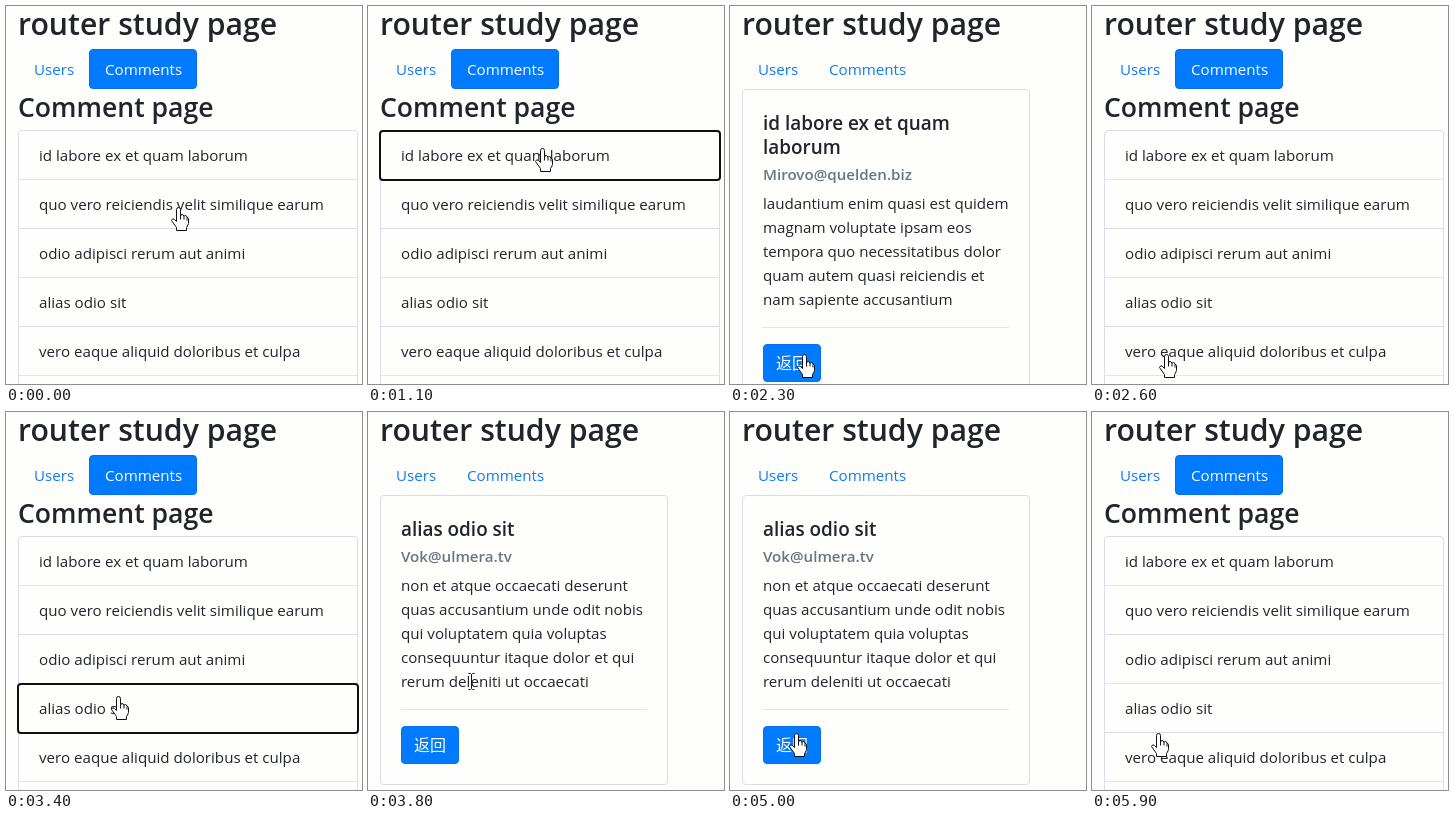
Animation of 356x378 px, one loop 6 s. Source, as an HTML page:

```html
<!DOCTYPE html>
<html lang="en">
<head>
<meta charset="utf-8">
<title>router study page</title>
<style>
  html, body { margin: 0; height: 100%; overflow: hidden; background: #fefefc; }
  svg { display: block; }
  text { font: 15.13px "Open Sans", "Noto Sans", "Noto Sans CJK SC", sans-serif; fill: #212529; }
  .h1 { font-size: 30.2px; font-weight: 600; }
  .h2 { font-size: 26.6px; font-weight: 600; }
  .h5 { font-size: 18.9px; font-weight: 600; }
  .h6 { font-weight: 600; fill: #6c757d; }
  .link { fill: #0f7bee; }
  .on { fill: #fff; }
  .back { font: 16px "Noto Sans CJK SC", "Noto Sans CJK", sans-serif; text-anchor: middle; }
  .button { fill: #007bff; stroke: #0072ee; }
  .box, .rule { fill: none; stroke: #dcdce6; }
  .soft { stroke: #e4e4ea; }
  #focus { fill: none; stroke: #101010; stroke-width: 2; }
  #cursor { fill: #fff; stroke: #111; stroke-linejoin: round; }
</style>
</head>
<body>
<svg width="356" height="378" viewBox="0 0 356 378">
  <text class="h1" x="12" y="29">router study page</text>
  <text class="link" x="28" y="69">Users</text>
  <g id="list"></g>
  <g id="card0"></g>
  <g id="card1"></g>
  <rect id="focus" x="12" width="340" height="49" rx="3"/>
  <path id="cursor"/>
</svg>
<script>
const $ = id => document.getElementById(id);
const text = (x, y, str, cls = '') => `<text class="${cls}" x="${x}" y="${y}">${str}</text>`;
const rect = (x, y, w, h, cls) =>
  `<rect class="${cls}" x="${x + .5}" y="${y + .5}" width="${w - 1}" height="${h - 1}" rx="3.5"/>`;
const rule = (x1, x2, y, cls = '') => `<path class="rule ${cls}" d="M${x1} ${y + .5}H${x2}"/>`;

const rows = [
  'id labore ex et quam laborum',
  'quo vero reiciendis velit similique earum',
  'odio adipisci rerum aut animi',
  'alias odio sit',
  'vero eaque aliquid doloribus et culpa'
];
const cards = [
  {
    title: ['id labore ex et quam', 'laborum'],
    mail: 'Mirovo@quelden.biz',
    body: ['laudantium enim quasi est quidem', 'magnam voluptate ipsam eos',
      'tempora quo necessitatibus dolor', 'quam autem quasi reiciendis et',
      'nam sapiente accusantium']
  },
  {
    title: ['alias odio sit'],
    mail: 'Vok@ulmera.tv',
    body: ['non et atque occaecati deserunt', 'quas accusantium unde odit nobis',
      'qui voluptatem quia voluptas', 'consequuntur itaque dolor et qui',
      'rerum deleniti ut occaecati']
  }
];

$('list').innerHTML =
  rect(83, 43, 108, 40, 'button') + text(99, 69, 'Comments', 'on') +
  text(12, 111, 'Comment page', 'h2') + rect(12, 124, 340, 300, 'box') +
  rows.map((row, i) => text(33, 155 + 49 * i, row) +
    rule(13, 351, 173 + 49 * i, i % 2 ? '' : 'soft')).join('');

cards.forEach(({ title, mail, body }, i) => {
  const top = 24 * (title.length - 1);
  $('card' + i).innerHTML =
    text(99, 69, 'Comments', 'link') + rect(12, 83, 288, 290 + top, 'box') +
    title.map((line, n) => text(33, 124 + 24 * n, line, 'h5')).join('') +
    text(33, 150 + top, mail, 'h6') +
    body.map((line, n) => text(33, 179 + top + 24 * n, line)).join('') +
    rule(33, 279, 297 + top, 'soft') +
    rect(33, 314 + top, 58, 38, 'button') + text(62, 339 + top, '返回', 'on back');
});

const shapes = {
  hand: 'M-2 14V2Q-2 0 0 0T2 2V9Q2 7 3.5 7T5.5 9Q5.5 8 7 8T8.5 10Q9.5 9.5 10 11V16Q9 19 8 20V23H-2V20L-7 13Q-6 10-4 12ZM2 8V12M5.5 9V12M8.5 10V13',
  arrow: 'M0 0V16L4 13L7 19L9 18L6.5 12H11Z',
  beam: 'M-3-8H-1L0-7L1-8H3M0-7V7M-3 8H-1L0 7L1 8H3'
};

// time, x, y of the pointer's hot spot
const path = [
  [0, 172, 201], [1000, 174, 142], [1200, 174, 142], [1700, 77, 313],
  [2100, 74, 348], [2600, 74, 348], [3200, 112, 284], [3500, 112, 284],
  [4400, 77, 227], [4900, 66, 321], [6000, 66, 321]
];

function pointerAt(t) {
  const i = path.findIndex(key => key[0] > t);
  const [t0, x0, y0] = path[i - 1], [t1, x1, y1] = path[i];
  const p = (t - t0) / (t1 - t0), ease = p * p * (3 - 2 * p);
  return [x0 + (x1 - x0) * ease, y0 + (y1 - y0) * ease].map(Math.round);
}

function pointerShape(x, y, page) {
  if (page === 'list') return 'hand';
  const top = page === 'card0' ? 24 : 0;
  if (y >= 314 + top && x < 91) return 'hand';
  return y > 104 && y < 281 + top && x < 279 ? 'beam' : 'arrow';
}

const within = (t, from, to) => t >= from && t < to;

function draw(now) {
  const t = Math.floor(now % 6000 / 100) * 100;
  const page = within(t, 1200, 2400) ? 'card0' : within(t, 3500, 5300) ? 'card1' : 'list';
  for (const id of ['list', 'card0', 'card1']) $(id).style.display = id === page ? '' : 'none';

  const row = within(t, 1000, 1200) ? 0 : within(t, 3300, 3500) ? 3 : -1;
  $('focus').style.display = row < 0 ? 'none' : '';
  $('focus').setAttribute('y', 125 + 49 * row);

  const [x, y] = pointerAt(t);
  $('cursor').setAttribute('d', shapes[pointerShape(x, y, page)]);
  $('cursor').setAttribute('transform', `translate(${x + .5} ${y + .5})`);
}

const start = performance.now();
function tick() {
  draw(performance.now() - start);
  requestAnimationFrame(tick);
}
tick();
</script>
</body>
</html>
```
